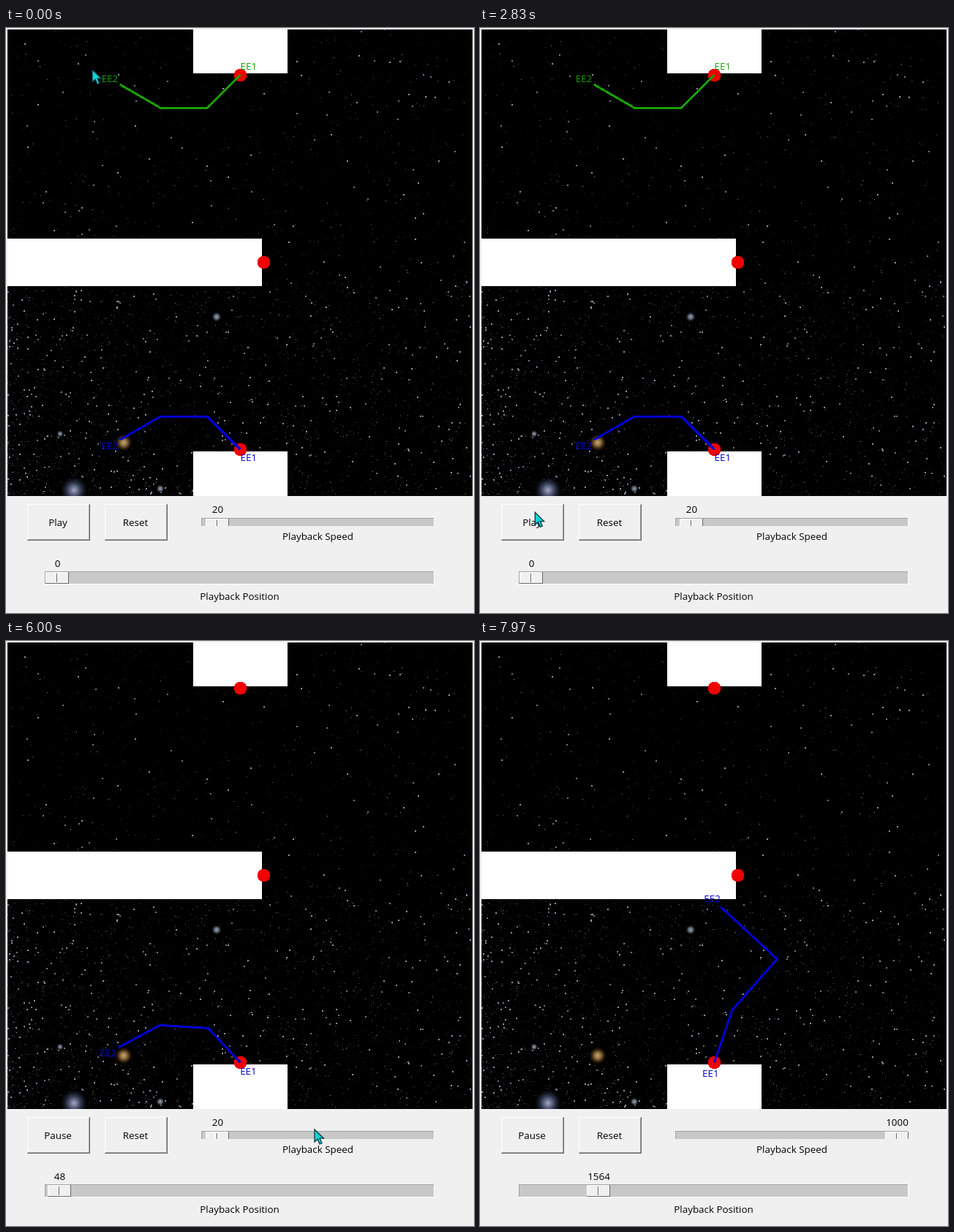
These frames come from a looping animation (640 px wide and 800 px high, 8000 ms). An HTML page:

```html
<!DOCTYPE html>
<html lang="en">
<head>
<meta charset="utf-8">
<title>Arm playback</title>
<style>
  html, body { margin: 0; width: 100%; height: 100%; overflow: hidden; background: #f0f0f0; }
  svg { display: block; width: 640px; height: 800px; }
  text { font: 13.4px "Open Sans", "Noto Sans", sans-serif; text-anchor: middle; }
  polyline { fill: none; stroke-width: 3; shape-rendering: crispEdges; }
  circle.joint { fill: #f00000; shape-rendering: crispEdges; }
</style>
</head>
<body>
<svg id="stage" viewBox="0 0 640 800"></svg>
<script>
const LOOP = 8000, PLAY_AT = 4730, DRAG_AT = 6354, DRAG_MS = 380, DROP_AT = 7100;
const RATE = 0.03775, EXTRA_RATE = 1.0105;
const PANEL = '#f0f0f0', TROUGH = '#c8c8c8', LIGHT = '#ffffff', SHADE = '#696969', DARK = '#a0a0a0';

const clamp = (v, a, b) => Math.max(a, Math.min(b, v));
const ease = u => u * u * (3 - 2 * u);
const poly = ([a, b, c], x) => a + b * x + c * x * x;

// Each link's heading (degrees) and length as quadratics of the playback position
const LINKS = [
  { turn: [135, -0.0408, 0], size: [64, 0.0076, 0] },
  { turn: [180, -0.0714, -8e-6], size: [64, 0.0486, -1.93e-5] },
  { turn: [210, -0.0367, -6.3e-6], size: [64, 0.0039, 1.42e-5] }
];

// Pointer moves: start time, end time, destination
const HOME = [118, 57];
const MOVES = [
  [500, 1300, -20, 40], [1900, 2000, -20, 480], [2100, 3000, 85, 681],
  [4600, 4940, 259, 695], [4940, 6000, 422, 668], [6000, DRAG_AT, 297, 676],
  [DRAG_AT, DRAG_AT + DRAG_MS, 579, 685], [DROP_AT, 7700, 650, 690]
];

function pointerAt(t) {
  let [x, y] = HOME;
  for (const [from, to, tx, ty] of MOVES) {
    const u = ease(clamp((t - from) / (to - from), 0, 1));
    x += (tx - x) * u;
    y += (ty - y) * u;
  }
  return [x, y];
}

function seeded(s) {
  return () => {
    s = (s + 0x6D2B79F5) | 0;
    let r = Math.imul(s ^ (s >>> 15), 1 | s);
    r = (r + Math.imul(r ^ (r >>> 7), 61 | r)) ^ r;
    return ((r ^ (r >>> 14)) >>> 0) / 4294967296;
  };
}

// Even field, thicker in the lower half and thickest in the lower left corner
function starField() {
  const rnd = seeded(41);
  const tones = ['#24242a', '#3a3a44', '#565662', '#747484', '#9494a6'];
  const paths = tones.map(() => '');
  const add = (x, y) => {
    const tone = Math.floor(rnd() ** 1.8 * tones.length);
    const s = tone > 2 && rnd() < 0.5 ? 2 : 1;
    paths[tone] += `M${2 + Math.floor(x)} ${2 + Math.floor(y)}h${s}v${s}h-${s}z`;
  };
  for (let i = 0; i < 1400; i++) add(rnd() * 634, rnd() * 636);
  for (let i = 0; i < 800; i++) add(rnd() * 634, 340 + rnd() * 296);
  for (let i = 0; i < 1200; i++) add(634 * rnd() ** 1.9, 636 - 280 * rnd() ** 1.5);
  return paths.map((d, i) => `<path fill="${tones[i]}" d="${d}"/>`).join('');
}

const gradient = (id, core, mid, edge) => `<radialGradient id="${id}">
  <stop offset="0" stop-color="${core}"/><stop offset=".4" stop-color="${mid}"/>
  <stop offset="1" stop-color="${edge}" stop-opacity="0"/></radialGradient>`;

const glow = (x, y, r, id) => `<circle cx="${x}" cy="${y}" r="${r}" fill="url(#${id})"/>`;

const box = (x, y, w, h, fill) =>
  `<rect x="${x}" y="${y}" width="${w}" height="${h}" fill="${fill}"/>`;

const bevel = (x, y, w, h, fill, lit, shade) =>
  box(x, y, w, h, shade) + box(x, y, w - 1, h - 1, lit) + box(x + 1, y + 1, w - 2, h - 2, fill);

const label = (x, y, s, id = '') => `<text x="${x}" y="${y}" id="${id}">${s}</text>`;

const button = (x, s, id) => bevel(x, 651, 86, 50, PANEL, LIGHT, SHADE) +
  box(x + 84, 652, 1, 48, DARK) + box(x + 1, 699, 84, 1, DARK) + label(x + 42, 681, s, id);

// Slider knob centred on x = 0
const knob = (id, y, h) => `<g id="${id}">${bevel(-16, y, 32, h, PANEL, LIGHT, SHADE)}` +
  `${box(-1, y + 2, 1, h - 4, SHADE)}${box(0, y + 2, 1, h - 4, LIGHT)}</g>`;

const arm = (id, color) => `<g id="${id}"><polyline stroke="${color}"/>
  <g fill="${color}">${label(0, 0, 'EE1')}${label(0, 0, 'EE2')}</g></g>`;

const joint = (x, y) => `<circle class="joint" cx="${x}" cy="${y}" r="8.8"/>`;

const stage = document.getElementById('stage');
stage.innerHTML = `<defs>
  ${gradient('pale', '#8f98a8', '#68727e', '#20262c')}
  ${gradient('warm', '#c0a878', '#8a6838', '#3c1c08')}
  ${gradient('cool', '#a4a8c0', '#48506c', '#0c1828')}
  <clipPath id="slot"><rect id="slotBox" x="260" y="670" width="330" height="11"/></clipPath></defs>
  ${box(0, 0, 640, 640, '#000')}${starField()}
  ${glow(288, 395, 7, 'pale')}${glow(74, 555, 5, 'pale')}${glow(211, 630, 6, 'pale')}
  ${glow(161, 567, 12, 'warm')}${glow(93, 632, 19, 'cool')}
  ${box(0, 640, 640, 160, PANEL)}<path d="M1 640V1H639V640" fill="none" stroke="${PANEL}" stroke-width="2"/>
  ${box(256, 2, 129, 60, '#fff')}${box(256, 579, 129, 61, '#fff')}${box(2, 288, 348, 65, '#fff')}
  ${joint(320.5, 64.5)}${joint(352.5, 320.5)}${joint(320.5, 576.5)}
  ${arm('green', '#18a000')}${arm('blue', '#0000d0')}
  ${button(29, 'Play', 'toggle')}${button(135, 'Reset', 'reset')}
  <g clip-path="url(#slot)">${bevel(267, 670, 319, 18, TROUGH, DARK, LIGHT)}${knob('speedKnob', 671, 16)}</g>
  ${label(0, 663, '', 'speedText')}${label(426.5, 700, 'Playback Speed')}
  ${bevel(53, 743, 533, 18, TROUGH, DARK, LIGHT)}${knob('posKnob', 744, 16)}
  ${label(0, 737, '', 'posText')}${label(319.5, 782, 'Playback Position')}
  <path id="pointer" d="M0 0V17L4 13.3L7 20L10 18.6L7 12.2H12.4Z" fill="#14d2d6" stroke="#083840" stroke-width="1.3"/>`;

const $ = id => document.getElementById(id);

function drawArm(id, pos, flip) {
  const side = y => flip ? 640.5 - y : y;
  const pts = [[320.5, 576.5]];
  const dirs = [];
  for (const { turn, size } of LINKS) {
    const a = poly(turn, pos) * Math.PI / 180, len = poly(size, pos);
    const [x, y] = pts[pts.length - 1], d = [Math.cos(a), -Math.sin(a)];
    dirs.push(d);
    pts.push([x + len * d[0], y + len * d[1]]);
  }
  const node = $(id), tags = node.querySelectorAll('text');
  node.querySelector('polyline').setAttribute('points', pts.map(([x, y]) => x + ',' + side(y)).join(' '));
  const tag = (el, p, d, reach) => {
    el.setAttribute('x', p[0] + d[0] * reach);
    el.setAttribute('y', side(p[1] + d[1] * reach) + 4.5);
  };
  tag(tags[0], pts[0], dirs[0], -16);
  tag(tags[1], pts[3], dirs[2], 16);
}

function setSlider(name, x, value) {
  $(name + 'Knob').setAttribute('transform', `translate(${Math.round(x)} 0)`);
  $(name + 'Text').setAttribute('x', Math.round(x) + 0.5);
  $(name + 'Text').textContent = Math.round(value);
}

function render(t) {
  const playing = t >= PLAY_AT;
  const held = t >= DRAG_AT && t < DROP_AT;
  const u = clamp((t - DRAG_AT) / DRAG_MS, 0, 1);
  const speed = ease(u);
  // Position is the integral of the eased speed
  const boosted = DRAG_MS * (u ** 3 - u ** 4 / 2) + Math.max(0, t - DRAG_AT - DRAG_MS);
  const pos = RATE * Math.max(0, t - PLAY_AT) + EXTRA_RATE * boosted;

  drawArm('blue', pos, false);
  $('green').setAttribute('visibility', playing ? 'hidden' : 'visible');
  $('toggle').textContent = playing ? 'Pause' : 'Play';
  setSlider('speed', 288.5 + 281 * speed, 20 + 980 * speed);
  setSlider('pos', 70 + pos * 0.0588, pos);
  $('slotBox').setAttribute('height', held ? 13 : 11);
  $('pointer').setAttribute('transform', `translate(${pointerAt(t)})`);
}

drawArm('green', 0, true);
const start = performance.now();
function tick() {
  render((performance.now() - start) % LOOP);
  requestAnimationFrame(tick);
}
tick();
</script>
</body>
</html>
```
